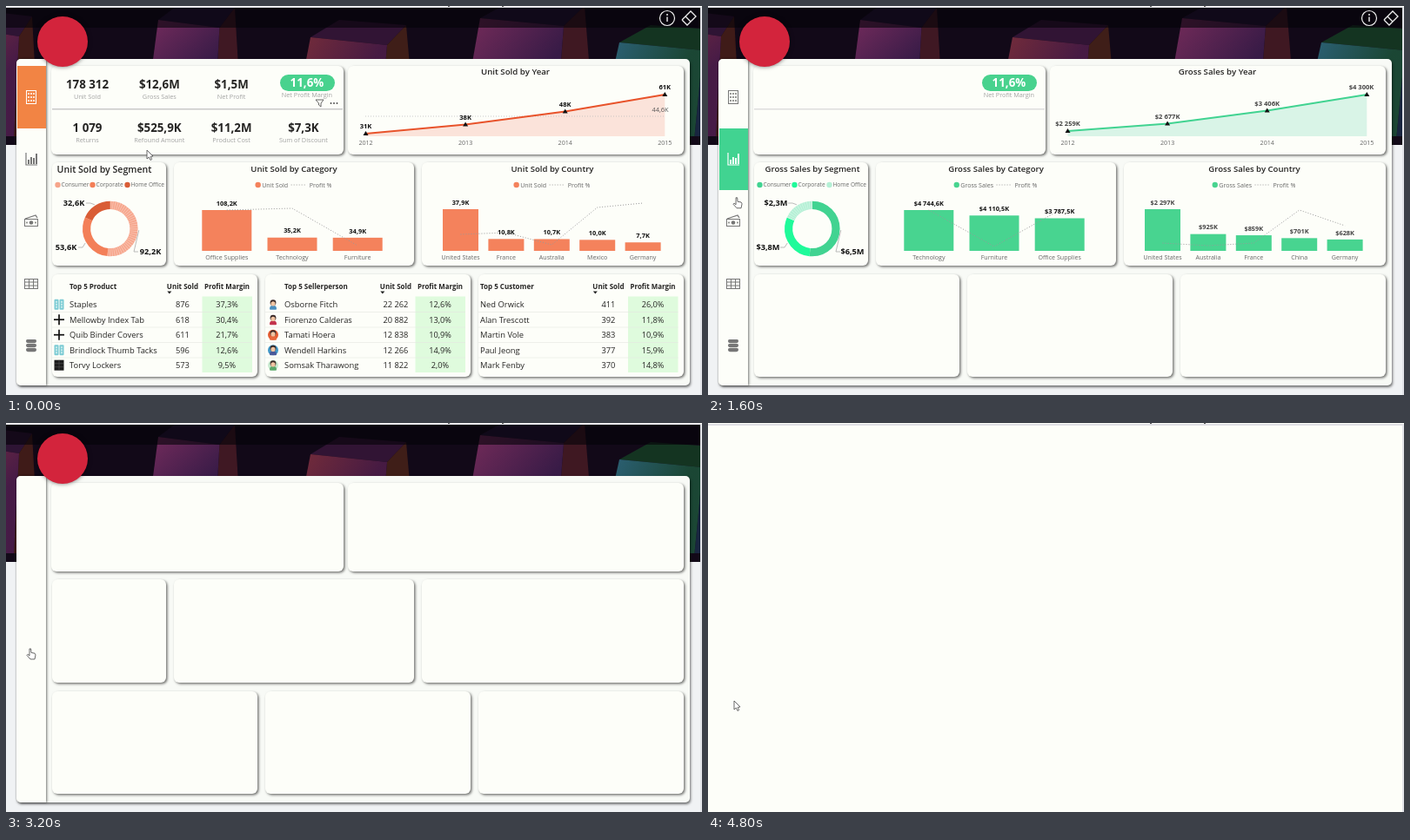
Recreate the animation shown at these times as an HTML page with a canvas. Size 800 by 448 pixels, loop 5000 ms.

```html
<!DOCTYPE html>
<html lang="en">
<head>
<meta charset="utf-8">
<title>Store dashboard</title>
<style>
  html, body { margin: 0; width: 100%; height: 100%; overflow: hidden; background: #fdfef9; }
  canvas { display: block; }
</style>
</head>
<body>
<canvas id="stage" width="800" height="448"></canvas>
<script>
const c = document.getElementById('stage').getContext('2d');
const FONT = '"Open Sans", "Noto Sans", sans-serif';
const PAPER = '#fdfef9', INK = '#252423', GREY = '#777', LABEL = '#666';
const TABS = ['#f28444', '#41d391', '#c42a52', '#1468b8'];

// Chart entries are "label|value"; heights and angles follow from the values.
const VIEWS = [{
  name: 'Unit Sold', color: '#f4825c', line: '#e8532b', tint: '#fbe3da', ink: '#111',
  years: ['31K', '38K', '48K', '61K'], yearLow: 147,
  ring: ['#f6a58b', '#f37f58', '#d95d36'], shares: ['92,2K', '53,6K', '32,6K'], hatch: 0,
  cats: ['Office Supplies|108,2K', 'Technology|35,2K', 'Furniture|34,9K'], catTrend: [235, 233, 276],
  lands: ['United States|37,9K', 'France|10,8K', 'Australia|10,7K', 'Mexico|10,0K', 'Germany|7,7K'],
  landTrend: [263, 261, 275, 232, 227], shift: 0,
  tables: [
    ['cards|Staples|876|37,3%', 'plus|Mellowby Index Tab|618|30,4%', 'plus|Quib Binder Covers|611|21,7%',
      'cards|Brindlock Thumb Tacks|596|12,6%', 'locker|Torvy Lockers|573|9,5%'],
    ['man0|Osborne Fitch|22 262|12,6%', 'man1|Fiorenzo Calderas|20 882|13,0%', 'man2|Tamati Hoera|12 838|10,9%',
      'man3|Wendell Harkins|12 266|14,9%', 'man4|Somsak Tharawong|11 822|2,0%'],
    ['|Ned Orwick|411|26,0%', '|Alan Trescott|392|11,8%', '|Martin Vole|383|10,9%',
      '|Paul Jeong|377|15,9%', '|Mark Fenby|370|14,8%']]
}, {
  name: 'Gross Sales', color: '#48d490', line: '#41d391', tint: '#d9f4e7', ink: '#444',
  years: ['$2 259K', '$2 677K', '$3 406K', '$4 300K'], yearLow: 144,
  ring: ['#41d391', '#1ffa9a', '#b4f0d5'], shares: ['$6,5M', '$3,8M', '$2,3M'], hatch: 2,
  cats: ['Technology|$4 744,6K', 'Furniture|$4 110,5K', 'Office Supplies|$3 787,5K'], catTrend: [235, 277, 235],
  lands: ['United States|$2 297K', 'Australia|$925K', 'France|$859K', 'China|$701K', 'Germany|$628K'],
  landTrend: [273, 276, 273, 235, 253], shift: 3,
  tables: [
    ['phone|Velro Smart Phone|$161K|19,3%', 'phone|Junda Smart Phone|$145K|17,2%', 'phone|Bravonix Smart Phone|$142K|11,6%',
      'phone|Tellurk Smart Phone|$141K|8,5%', 'phone|Plimb Smart Phone|$131K|11,1%'],
    ['man0|Osborne Fitch|$1 732K|12,6%', 'man1|Fiorenzo Calderas|$1 223K|13,0%', 'man2|Tamati Hoera|$1 100K|10,9%',
      'man4|Somsak Tharawong|$884K|2,0%', 'man5|Raghuvend Bhosalkar|$867K|18,4%'],
    ['|Ian Fernwold|$40K|15,6%', '|Sabina Rathi|$37K|23,2%', '|Luke Pham|$36K|14,7%',
      '|Bartholomew Lisker|$35K|15,9%', '|Owen Tarble|$35K|-1,2%']]
}, {
  name: 'Net Profit', color: '#c42a52', line: '#c42a52', tint: '#f1d4dc', ink: '#444',
  years: ['$248,94K', '$307,42K', '$406,94K', '$504,17K'], yearLow: 142,
  ring: ['#c42a52', '#e85a80', '#edb6c5'], shares: ['$749K', '$441K', '$277K'], hatch: -1,
  cats: ['Technology|$663,8K', 'Office Supplies|$518,6K', 'Furniture|$285,1K'], catTrend: [233, 234, 261],
  lands: ['United States|$286,40K', 'China|$150,68K', 'India|$129,05K', 'United Kingdom|$111,90K', 'France|$109,03K'],
  landTrend: [263, 235, 231, 236, 261], shift: 1, wrap: true,
  tables: [
    ['phone|Velro Smart Phone|$31,05K|19,3%', 'fax|Fenlo quickPAGE 2...|$25,20K|40,9%', 'phone|Junda Smart Phone|$25,04K|17,2%',
      'cart|Ostrel Classic Bookc...|$23,37K|22,0%', 'fax|Granlow Wireless Fax|$21,37K|23,6%'],
    ['man0|Osborne Fitch|$218,43K|12,6%', 'man3|Samira Khelouf|$167,10K|19,5%', 'man5|Raghuvend Bhosalkar|$159,34K|18,4%',
      'man1|Fiorenzo Calderas|$158,98K|13,0%', 'man2|Tamati Hoera|$120,09K|10,9%'],
    ['|Ned Orwick|$7,41K|26,0%', '|Carson Rivas|$7,82K|25,8%', '|Leonard Kroy|$8,45K|28,6%',
      '|Mohit Rathi|$8,21K|30,9%', '|Sabina Rathi|$8,67K|23,2%']]
}];

const amount = s => Number(s.replace(/[^\d,]/g, '').replace(',', '.'));

function text(s, x, y, size, color = INK, align = 'center', weight = 400) {
  c.font = `${weight} ${size}px ${FONT}`;
  c.fillStyle = color;
  c.textAlign = align;
  c.fillText(s, x, y + size * .36);
  return c.measureText(s).width;
}
function rect(x, y, w, h, color) {
  c.fillStyle = color;
  c.fillRect(x, y, w, h);
}
function round(x, y, w, h, r, color) {
  c.fillStyle = color;
  c.beginPath();
  c.roundRect(x, y, w, h, r);
  c.fill();
}
function dot(x, y, r, color) {
  c.fillStyle = color;
  c.beginPath();
  c.arc(x, y, r, 0, 7);
  c.fill();
}
function path(points) {
  c.beginPath();
  points.forEach(p => c.lineTo(...p));
}
function poly(points, color) {
  path(points);
  c.fillStyle = color;
  c.fill();
}
function line(points, color, width = 1, dash = []) {
  path(points);
  c.strokeStyle = color;
  c.lineWidth = width;
  c.setLineDash(dash);
  c.stroke();
  c.setLineDash([]);
}
function shadow(blur, x, y, draw) {
  c.save();
  c.shadowColor = 'rgba(0,0,0,.55)';
  c.shadowBlur = blur;
  c.shadowOffsetX = x;
  c.shadowOffsetY = y;
  draw();
  c.restore();
}

function page() {
  rect(0, 0, 800, 448, PAPER);
  rect(0, 1, 800, 2, '#dfdfe4');
  rect(798, 1, 2, 447, '#e2e3e8');
  for (const x of [508, 570]) rect(x, 0, 2, 1, '#555');
}

function cube(x, y, w, hue) {
  const tone = (turn, light) => `hsl(${hue + turn} 45% ${light}%)`;
  const g = c.createLinearGradient(x, y, x + w * .6, 75);
  g.addColorStop(0, tone(0, 30));
  g.addColorStop(1, tone(-40, 19));
  const left = [x, y], front = [x + w * .8, y + 9], back = [x + w, y - 14], top = [x + w * .3, y - 20];
  poly([left, front, back, top], tone(-50, 14));
  poly([front, back, [x + w * 1.1, 150], [x + w * .72, 150]], tone(25, 17));
  poly([left, front, [x + w * .72, 150], [x - w * .2, 150]], g);
}

function banner() {
  rect(0, 160, 798, 288, '#f0f2f4');
  c.save();
  c.beginPath();
  c.rect(0, 2, 798, 158);
  c.clip();
  rect(0, 2, 798, 158, '#120918');
  cube(-45, 26, 75, 340);
  cube(175, 16, 88, 318);
  cube(350, 36, 110, 345);
  cube(545, 14, 120, 320);
  cube(705, 42, 120, 195);
  rect(0, 2, 798, 23, 'rgba(4,3,8,.6)');
  c.restore();
}

function panels() {
  shadow(3, 1, 2, () => round(12, 61, 774, 376, 5, '#f8faf6'));
  shadow(3, 1, 0, () => round(12, 61, 34, 376, [5, 0, 0, 5], PAPER));
  const rows = [[69, 102, 5, [52, 393, 784]], [180, 119, 9, [53, 193, 478, 788]], [309, 118, 9, [53, 298, 543, 788]]];
  for (const [y, h, gap, xs] of rows) {
    xs.slice(1).forEach((next, i) => shadow(3, 1.5, 1.5, () => round(xs[i], y, next - xs[i] - gap, h, 6, PAPER)));
  }
  shadow(5, 0, 0, () => dot(65, 41, 29, '#d3243c'));
}

function frame(x, y, w, h, color) {
  c.strokeStyle = color;
  c.lineWidth = 1;
  c.strokeRect(x, y, w, h);
}

const SIDE = [
  col => {
    frame(23.5, 97.5, 11, 15, col);
    for (const y of [101, 105, 109]) line([[25, y], [33, y]], col, 1.5, [2, 1]);
  },
  col => {
    line([[23, 169], [23, 183], [36, 183]], col, 1.2);
    [5, 8, 7, 12].forEach((h, i) => rect(25 + i * 3, 182 - h, 2, h, col));
  },
  col => {
    line([[22, 245], [34, 241], [36, 244]], col, 1.3);
    frame(21.5, 245.5, 15, 8, col);
    dot(29, 249.5, 2.3, col);
    for (const x of [24, 34]) dot(x, 249.5, .9, col);
  },
  col => {
    frame(21.5, 314.5, 15, 11, col);
    for (const y of [318, 322]) line([[22, y], [36, y]], col);
    for (const x of [26.5, 31.5]) line([[x, 315], [x, 325]], col);
  },
  col => {
    for (let i = 0; i < 3; i++) round(23, 384 + i * 5, 12, 4.2, [3, 3, 5, 5], col);
  }
];

function sidebar(active, hover) {
  SIDE.forEach((icon, i) => {
    const on = i === active || i === hover;
    const y = Math.round(69 + i * 71.6);
    if (on) rect(13, y, 33, Math.round(69 + (i + 1) * 71.6) - y, TABS[i]);
    icon(on ? '#fff' : GREY);
  });
  c.strokeStyle = '#eee';
  c.lineWidth = 1.2;
  c.beginPath();
  c.arc(760, 14, 8.5, 0, 7);
  c.stroke();
  line([[760, 12.5], [760, 18]], '#eee', 1.4);
  dot(760, 10, 1, '#eee');
  line([[777, 16], [787, 6], [793, 12], [783, 22], [777, 16]], '#eee', 1.3);
  line([[781, 12], [787, 18]], '#eee', 1.3);
}

const KPIS = ['178 312|Unit Sold', '$12,6M|Gross Sales', '$1,5M|Net Profit', '11,6%|Net Profit Margin',
  '1 079|Returns', '$525,9K|Refound Amount', '$11,2M|Product Cost', '$7,3K|Sum of Discount'];

function kpis(full, hover) {
  rect(53, 118, 334, 1.5, hover ? '#c9c9c9' : '#dedede');
  round(315, 79, 63, 19, 9.5, '#48d28e');
  KPIS.forEach((item, i) => {
    const pill = i === 3;
    if (!full && !pill) return;
    const [value, label] = item.split('|');
    const x = 93.5 + i % 4 * 82.8 + (pill ? 4 : 0), y = pill ? 88 : i < 4 ? 90 : 140;
    text(value, x, y, 13.3, pill ? '#fff' : INK, 'center', 700);
    text(label, x, y + 14.5, 7.3, '#a3a3a3');
  });
  if (hover) {
    rect(355, 107, 29, 10, PAPER);
    line([[356, 108], [365, 108], [362, 112], [362, 116], [359.5, 114], [359.5, 112], [356, 108]], '#555', .9);
    for (const x of [373.5, 377, 380.5]) dot(x, 112, .9, '#444');
  }
}

function yearChart(v) {
  const sums = v.years.map(amount), low = sums[0], high = sums[3];
  const pts = sums.map((n, i) => [413.5 + i * 114.6, 102 + (v.yearLow - 102) * (high - n) / (high - low)]);
  text(v.name + ' by Year', 585.5, 76, 9.7, INK, 'center', 600);
  poly([...pts, [757.3, 150], [413.5, 150]], v.tint);
  if (v === VIEWS[0]) {
    line([[413, 127], [757, 127]], '#bbb', .8, [1, 2]);
    text('44,6K', 752, 119, 7.4, '#555');
  }
  line(pts, v.line, 2);
  pts.forEach(([x, y], i) => {
    const label = v.years[i];
    poly([[x, y - 3], [x + 3, y + 2], [x - 3, y + 2]], '#111');
    text(label, Math.min(x, 772 - label.length * 3), y - 8.5, 7.6, v.ink, 'center', 700);
    text(2012 + i, x, 157, 7.1, LABEL);
  });
}

function ringChart(v) {
  const first = v === VIEWS[0], cx = 119.8, cy = 256.5;
  const spots = [[166, 283], [69, 278], [78, 227]];
  text(v.name + ' by Segment', first ? 113 : 120, 188, first ? 10.6 : 9.6, INK, 'center', 600);
  ['Consumer', 'Corporate', 'Home Office'].forEach((s, i) => {
    dot(59.5 + i * 40, 206, 3.2, v.ring[i]);
    text(s, 63.5 + i * 40, 206, 6.6, LABEL, 'left');
  });
  const parts = v.shares.map(amount), sum = parts.reduce((a, b) => a + b);
  let start = -Math.PI / 2;
  parts.forEach((part, i) => {
    const end = start + part / sum * 2 * Math.PI, mid = (start + end) / 2;
    const arc = (color, dash) => {
      c.beginPath();
      c.arc(cx, cy, 27.2, start, end);
      c.strokeStyle = color;
      c.lineWidth = 9.2;
      c.setLineDash(dash);
      c.stroke();
      c.setLineDash([]);
    };
    arc(v.ring[i], []);
    if (i === v.hatch) arc('rgba(255,255,255,.3)', [1, 1.5]);
    const [x, y] = spots[i], side = i ? 1 : -1, edge = x + side * 14;
    line([[cx + 33 * Math.cos(mid), cy + 33 * Math.sin(mid)], [edge + side * 5, y], [edge, y]], '#aaa', .8);
    text(v.shares[i], x, y, 9.2, '#111', 'center', 700);
    start = end;
  });
}

function legend(v, cx) {
  c.font = `400 7.1px ${FONT}`;
  const w = c.measureText(v.name).width;
  const x = cx - (w + c.measureText('Profit %').width + 33) / 2;
  dot(x + 3, 206, 3.2, v.color);
  text(v.name, x + 7.5, 206, 7.1, LABEL, 'left');
  line([[x + w + 11, 206], [x + w + 29, 206]], '#999', 1, [1, 2]);
  text('Profit %', x + w + 32, 206, 7.1, LABEL, 'left');
}

function barChart(v, title, data, trend, o) {
  text(`${v.name} by ${title}`, o.cx, 188, 9.6, INK, 'center', 600);
  legend(v, o.cx);
  const bars = data.map((entry, i) => {
    const [label, value] = entry.split('|');
    return { label, value, x: o.x + i * o.step, h: o.height * amount(value) / amount(data[0].split('|')[1]) };
  });
  for (const b of bars) rect(b.x - o.width / 2, o.base - b.h, o.width, b.h, v.color);
  line(trend.map((y, i) => [bars[i].x, y]), '#999', 1, [1, 2]);
  for (const b of bars) {
    text(b.value, b.x, o.base - b.h - 8, 7.4, o.ink, 'center', 700);
    const lines = b.label.endsWith('Kingdom') ? b.label.split(' ') : [b.label];
    lines.forEach((s, k) => text(s, b.x, (o.base < 282 ? 281 : 289) + k * 10, 7.1, LABEL));
  }
}

const SHIRTS = ['#4a8fc0', '#c3334c', '#e8683c', '#4a5a9a', '#5aa86a', '#51606c'];
const BACKS = [, , '#e45c32', '#4298c8', '#c9ead0'];
function rowIcon(kind, x, y) {
  if (kind.startsWith('man')) {
    const n = +kind[3];
    if (BACKS[n]) dot(x, y, 6, BACKS[n]);
    round(x - 4, y + 1, 8, 5, [4, 4, 1, 1], SHIRTS[n]);
    dot(x, y - 2, 3.4, '#3a2a28');
    dot(x, y - .8, 2.6, n === 5 ? '#a86f4c' : '#f0c4a2');
  } else if (kind === 'cards') {
    for (const k of [-5.5, .5]) {
      round(x + k, y - 6, 5, 12, 1, '#7ccbd4');
      line([[x + k + 2.5, y - 4], [x + k + 2.5, y + 4]], '#e4f7f5', 1.4, [2, 1]);
    }
  } else if (kind === 'plus') {
    line([[x - 6, y], [x + 6, y]], '#111', 1.7);
    line([[x, y - 6], [x, y + 6]], '#111', 1.7);
  } else if (kind === 'locker') {
    rect(x - 5.5, y - 6, 11, 12, '#1c1c1c');
    for (const k of [-2, 2]) line([[x - 5, y + k], [x + 5, y + k]], '#555', .6);
    line([[x, y - 6], [x, y + 6]], '#555', .6);
  } else if (kind === 'phone') {
    round(x - 6, y - 5.5, 12, 4, 2, '#111');
    poly([[x - 2.5, y - 2], [x + 2.5, y - 2], [x + 5, y + 5], [x - 5, y + 5]], '#111');
    dot(x, y + 1.5, 1.8, '#fff');
  } else if (kind === 'fax') {
    round(x - 6, y - 4, 12, 7, 1, '#dcdedd');
    rect(x - 4, y - 2, 8, 2, '#f3f3f3');
  } else if (kind === 'cart') {
    line([[x - 6, y - 5], [x - 4, y - 5], [x - 2, y + 2], [x + 4, y + 2]], '#111', 1.2);
    poly([[x - 3.5, y - 4], [x + 6, y - 4], [x + 4, y + 1], [x - 2, y + 1]], '#333');
    for (const k of [-1, 3.5]) dot(x + k, y + 4.5, 1.3, '#111');
  }
}

function table(v, n) {
  const x = 53 + n * 245, left = x + [20, 22, 2][n];
  const mid = x + 201 + (n < 2 ? v.shift : -.5), right = mid - 33;
  text('Top 5 ' + ['Product', 'Sellerperson', 'Customer'][n], left, 323.5, 8, INK, 'left', 700);
  const w = text(v.name, right, 323, 8, INK, 'right', 700);
  text('Profit Margin', mid, 323, 7.9, INK, 'center', 700);
  const tip = right - w + 3;
  poly([[tip - 2.5, 328.5], [tip + 2.5, 328.5], [tip, 331.5]], '#222');
  rect(mid - 28.5, 334.5, 57.5, 87.5, '#dffbdd');
  v.tables[n].forEach((row, i) => {
    const [icon, name, value, margin] = row.split('|'), y = 343.7 + i * 17.5;
    if (margin[0] === '-') rect(mid - 28.5, y - 9, 57.5, 17.5, '#f3c9cd');
    if (i) rect(x, y - 9, mid + 29 - x, .6, '#e4e6e2');
    rowIcon(icon, x + 8 + n, y);
    text(name, left, y, 9.4, INK, 'left');
    // Plain counts are centred under their heading, money is flush right.
    if (value[0] === '$') text(value, right, y, 9.3, INK, 'right');
    else text(value, right - w / 2, y, 9.3);
    text(margin, mid, y, 9.2);
  });
}

function dashboard(v, full, tabHover, kpiHover) {
  sidebar(VIEWS.indexOf(v), tabHover);
  kpis(full, kpiHover);
  yearChart(v);
  ringChart(v);
  barChart(v, 'Category', v.cats, v.catTrend,
    { cx: 331, x: 253.8, step: 75.2, width: 57, base: 282, height: 47, ink: '#111' });
  barChart(v, 'Country', v.lands, v.landTrend, v.wrap
    ? { cx: 628, x: 529, step: 51, width: 40, base: 269, height: 37, ink: v.ink }
    : { cx: 628, x: 522.5, step: 52.4, width: 41, base: 282, height: 48, ink: v.ink });
  if (full) for (let n = 0; n < 3; n++) table(v, n);
}

const CLICKS = [1100, 3100, 4600];
const SPOTS = [[162, 166], [39, 167], [27, 260], [30, 320]];

// Rests on each tab, then glides to the next one, slowing down on arrival.
function cursor(t, step, hand) {
  const k = Math.min(step, 2);
  const from = k ? CLICKS[k - 1] + 200 : 0, until = CLICKS[k] - 600;
  const p = Math.min(1, Math.max(0, (t - from) / (until - from)));
  const ease = 1 - (1 - p) ** 3;
  const [x, y] = SPOTS[k].map((a, i) => a + (SPOTS[k + 1][i] - a) * ease);
  const shape = hand
    ? [[0, 0], [1.6, 0], [2, 4.5], [6, 5.2], [7, 7], [6, 12], [1, 12], [-3, 7.5], [-2, 6.3], [0, 8]]
    : [[0, 0], [0, 10], [2.4, 8], [4, 11.5], [5.6, 10.6], [4.2, 7.4], [7, 7]];
  c.save();
  c.translate(x, y);
  poly(shape, '#fff');
  line([...shape, shape[0]], '#444', .8);
  c.restore();
}

function draw() {
  const t = Math.floor(performance.now() / 100) * 100 % 5000;
  const step = CLICKS.filter(click => click <= t).length;
  const blank = step === 3;
  const age = step ? t - CLICKS[step - 1] : Infinity;
  const hover = t >= CLICKS[step] - 700 ? step + 1 : -1;
  page();
  if (!blank) {
    banner();
    panels();
    if (age >= 200) dashboard(VIEWS[step], age >= 600, hover, t < 400);
  }
  cursor(t, step, t >= 400 && !blank);
  requestAnimationFrame(draw);
}
draw();
</script>
</body>
</html>
```
